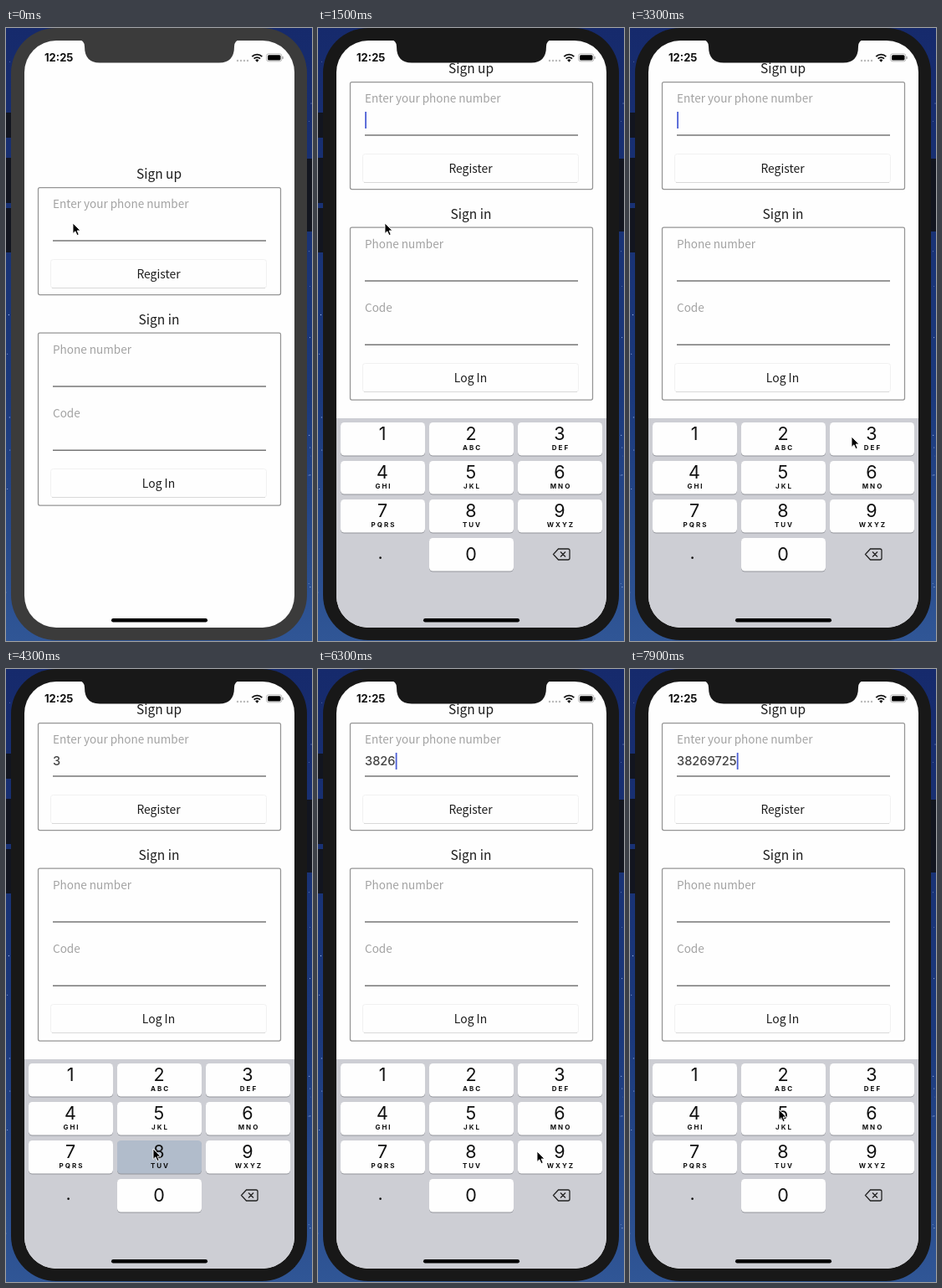
An HTML page that plays this animation: 366 px wide and 732 px high, repeating every 8000 ms.

```html
<!DOCTYPE html>
<html lang="en">
<head>
<meta charset="utf-8">
<style>
  html, body { margin: 0; width: 100%; height: 100%; overflow: hidden; background: #1a3777; }
  svg { display: block; width: 100%; height: 100%; }
  .ui { font: 13.9px "Noto Sans CJK JP", "Noto Sans CJK SC", "Noto Sans CJK", "Open Sans", sans-serif; fill: #1c1c1c; }
  .mid { text-anchor: middle; }
  .title { font-size: 15.5px; }
  .label { font-size: 13.55px; font-weight: 300; fill: #a2a2a2; }
  .sys { font-family: Inter, "Liberation Sans", sans-serif; }
  .letters { font-size: 8px; font-weight: 700; letter-spacing: 2px; }
  .box { fill: none; stroke: #959595; stroke-width: 1.25; }
</style>
</head>
<body>
<svg viewBox="0 0 366 732">
  <defs>
    <linearGradient id="sky" x2="0" y2="1">
      <stop stop-color="#162a6c"/><stop offset=".6" stop-color="#1b397c"/><stop offset="1" stop-color="#305696"/>
    </linearGradient>
    <clipPath id="screen"><rect x="22" y="15" width="323" height="701" rx="38"/></clipPath>
  </defs>
  <rect width="366" height="732" fill="url(#sky)"/>
  <g id="stars" fill="#9db4e6"></g>
  <path d="M0 101h7v30H0zM0 155h7v54H0zM0 215h7v53H0zM359 156h7v87h-7z" fill="#12151f"/>
  <rect id="bezel" x="6" y="0" width="354" height="731" rx="54"/>
  <g clip-path="url(#screen)">
    <rect x="22" y="15" width="323" height="701" fill="#fefefe"/>
    <g id="form" class="ui">
      <rect class="box" x="38.5" y="64.5" width="290" height="128" rx="2"/>
      <rect class="box" x="38.5" y="238" width="290" height="206" rx="2"/>
      <path d="M56 128h255M56 302h255M56 378.2h255" stroke="#777" stroke-width="1.5"/>
      <g fill="#fefefe" stroke="#f1f1f1">
        <rect x="53.5" y="150.5" width="258" height="34" rx="3"/>
        <rect x="53.5" y="400.5" width="258" height="34" rx="3"/>
      </g>
      <path d="M55 184.5h255M55 434.5h255" stroke="#d9d9d9"/>
      <text class="label" x="56" y="89">Enter your phone number</text>
      <text class="label" x="56" y="262.5">Phone number</text>
      <text class="label" x="56" y="339">Code</text>
      <text class="mid" x="182.5" y="172.7">Register</text>
      <text class="mid" x="182.5" y="423">Log In</text>
      <text id="typed" class="sys" x="56" y="114.8" font-size="14.6" font-weight="500" fill="#444"></text>
      <rect id="caret" y="100" width="1.8" height="20" fill="#4c5fd5"/>
    </g>
    <g id="titles" class="ui title mid">
      <text x="183" y="54">Sign up</text>
      <text x="183" y="228">Sign in</text>
    </g>
    <g id="keyboard" class="sys mid" fill="#111">
      <rect x="22" y="466" width="323" height="260" fill="#cdced4"/>
      <g id="keys" font-size="21.5"></g>
      <text x="74.5" y="634" font-size="18" font-weight="600">.</text>
      <path d="M287.5 622H299q2 0 2 2v9q0 2-2 2H287.5L281.5 628.5ZM290 625.5l6 6m0-6l-6 6" fill="none" stroke="#222" stroke-width="1.3"/>
    </g>
  </g>
  <path id="notch" d="M86 13Q94 15 94 22Q94 41.5 112 41.5H255Q273 41.5 273 22Q273 15 281 13Z"/>
  <text class="sys" x="46" y="40" font-size="13" font-weight="700" fill="#111">12:25</text>
  <g fill="#bbb"><circle cx="277" cy="39" r="1.2"/><circle cx="281" cy="39" r="1.2"/><circle cx="285" cy="39" r="1.2"/><circle cx="289" cy="39" r="1.2"/></g>
  <path d="M294.3 34.2a8.3 8.3 0 0 1 12 0M296.6 36.7a5 5 0 0 1 7.4 0" fill="none" stroke="#111" stroke-width="1.8"/>
  <path d="M298.2 38.4a3 3 0 0 1 4.2 0L300.3 40.8z" fill="#111"/>
  <rect x="311.5" y="30.8" width="18.4" height="9" rx="2.6" fill="none" stroke="#aaa" stroke-width=".8"/>
  <path d="M331 34v3" stroke="#999" stroke-width="1.3"/>
  <rect x="313" y="32.2" width="15.5" height="6.2" rx="1.5"/>
  <rect x="126" y="705" width="115" height="4.4" rx="2.2"/>
  <path id="cursor" d="M0 0V12.5L2.9 9.8L5 14.6L7.2 13.6L5.1 9H9Z" stroke="#fff" stroke-width=".9"/>
</svg>
<script>
const $ = id => document.getElementById(id);
const LOOP = 8000, STEP = 100, WAKE = 700, FOCUS = 1100;

// [time of entry, key]
const PRESSES = [[3600, 3], [4400, 8], [5000, 2], [5900, 6], [6500, 9], [7000, 7], [7400, 2], [7800, 5]];

// [time, x, y] of the pointer tip; equal neighbours are rests
const PATH = [
  [0, 80, 233], [2000, 80, 233], [3000, 265, 488], [3600, 265, 488],
  [4200, 176, 573], [4400, 176, 573], [4900, 200, 488], [5000, 200, 488],
  [5400, 111, 576], [5500, 111, 576], [5800, 270, 532], [5900, 270, 532],
  [6300, 262, 576], [6500, 262, 576], [6800, 102, 571], [7000, 102, 571],
  [7300, 205, 486], [7400, 205, 486], [7700, 178, 526], [8000, 178, 526]
];

const LETTERS = ["", "ABC", "DEF", "GHI", "JKL", "MNO", "PQRS", "TUV", "WXYZ"];

function keyMarkup(digit) {
  const i = digit ? digit - 1 : 10;
  const x = 27 + 106 * (i % 3), y = 471 + 46 * Math.floor(i / 3), cx = x + 50;
  const rect = (dy, attrs) => `<rect x="${x}" y="${y + dy}" width="101" height="39.5" rx="4.5" ${attrs}/>`;
  return rect(1, 'fill="#93959b"') + rect(0, `id="key${digit}" fill="#fefefe"`) +
    `<text x="${cx}" y="${y + (digit ? 20.8 : 26.7)}">${digit}</text>` +
    (digit ? `<text class="letters" x="${cx + 1.5}" y="${y + 32.8}">${LETTERS[i]}</text>` : "");
}
$("keys").innerHTML = [1, 2, 3, 4, 5, 6, 7, 8, 9, 0].map(keyMarkup).join("");

let seed = 7;
const random = () => (seed = seed * 16807 % 2147483647) / 2147483647;
$("stars").innerHTML = Array.from({ length: 24 }, (_, i) =>
  `<circle cx="${i % 2 * 361 + random() * 5}" cy="${random() * 732}" r="${.3 + random() * .4}"/>`).join("");

// Critically damped spring from 0 to 1
function spring(ms) {
  const u = Math.max(0, ms) * .018;
  return u > 7 ? 1 : 1 - (1 + u) * Math.exp(-u);
}

function pointer(t) {
  const n = PATH.findIndex(p => p[0] > t);
  const [t0, x0, y0] = PATH[n - 1], [t1, x1, y1] = PATH[n];
  const u = (t - t0) / (t1 - t0), s = u * u * (3 - 2 * u);
  return `translate(${x0 + (x1 - x0) * s} ${y0 + (y1 - y0) * s})`;
}

const shift = (id, dy) => $(id).setAttribute("transform", `translate(0 ${dy})`);

function draw(t) {
  const frame = t < WAKE ? "#3b3b3b" : "#181818";
  $("bezel").setAttribute("fill", frame);
  $("notch").setAttribute("fill", frame);

  shift("titles", t < FOCUS ? 126 : 0);
  shift("form", 126 * (1 - spring(t - 1043.7)));
  shift("keyboard", 250 * (1 - spring(t - 1035.3)));
  $("keyboard").style.display = t < FOCUS ? "none" : "";

  const entered = PRESSES.filter(p => p[0] <= t);
  const typed = $("typed"), caret = $("caret");
  typed.textContent = entered.map(p => p[1]).join("");
  const since = t - (entered.length ? entered[entered.length - 1][0] : FOCUS);
  caret.style.display = since >= 0 && since % 1000 < 500 ? "" : "none";
  caret.setAttribute("x", 56.2 + (entered.length ? typed.getComputedTextLength() : 0));

  const down = PRESSES.find(p => t >= p[0] - 100 && t < p[0] + 100);
  for (let k = 0; k < 10; k++)
    $("key" + k).setAttribute("fill", down && down[1] === k ? "#b1bccb" : "#fefefe");

  $("cursor").setAttribute("transform", pointer(t));
}

const start = performance.now();
function tick() {
  const t = (performance.now() - start) % LOOP;
  draw(Math.floor(t / STEP) * STEP);
  requestAnimationFrame(tick);
}
tick();
</script>
</body>
</html>
```
